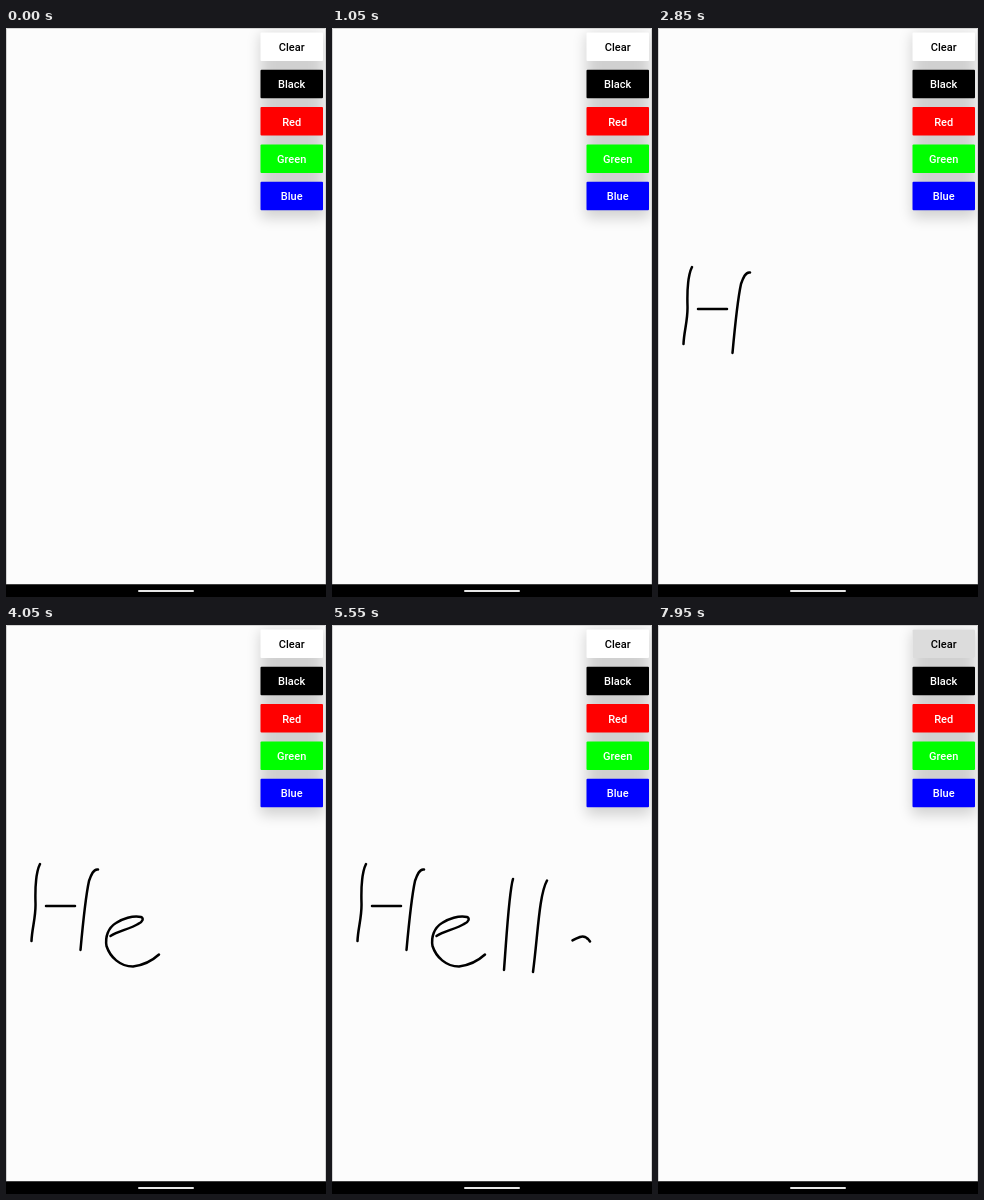
These frames come from a looping animation (320 px wide and 569 px high, 8 s). An HTML page:

```html
<!DOCTYPE html>
<html lang="en">
<head>
<meta charset="utf-8">
<title>Drawing pad</title>
<style>
  html, body { margin: 0; height: 100%; overflow: hidden; background: #000; }
  svg { display: block; width: 100%; height: 100%; }
  text { font: 500 11px Roboto, sans-serif; text-anchor: middle; }
  #ink path { fill: none; stroke: #000; stroke-width: 2.5; stroke-linecap: round; stroke-linejoin: round; }
</style>
</head>
<body>
<svg viewBox="0 0 320 569">
  <defs>
    <filter id="blur" x="-100%" y="-30%" width="300%" height="160%">
      <feGaussianBlur stdDeviation="7"/>
    </filter>
    <clipPath id="clearShape"><rect x="254.5" y="4.5" width="62.5" height="28.5" rx="1"/></clipPath>
  </defs>
  <rect width="320" height="556.5" fill="#fcfcfc"/>
  <rect x="254" y="6" width="64" height="184" opacity=".17" filter="url(#blur)"/>
  <path d="M.5 556V.5H319.5V556" fill="none" stroke="#d4d4d4"/>
  <g id="ink"></g>
  <g id="buttons"></g>
  <rect y="556.5" width="320" height="12.5"/>
  <rect x="132" y="562" width="56" height="2" rx="1" fill="#e6e6e6"/>
</svg>
<script>
const LOOP = 8000, PRESS = 7750, ERASE = 7880;
const $ = id => document.getElementById(id);

function add(parent, tag, attributes, text = '') {
  const node = document.createElementNS('http://www.w3.org/2000/svg', tag);
  for (const [key, value] of Object.entries(attributes)) node.setAttribute(key, value);
  node.textContent = text;
  return parent.appendChild(node);
}

const buttons = [
  ['Clear', '#fff', '#000'],
  ['Black', '#000', '#fff'],
  ['Red', '#f00', '#fff'],
  ['Green', '#0f0', '#fff'],
  ['Blue', '#00f', '#fff'],
];
let ripple;
buttons.forEach(([label, fill, ink], i) => {
  const y = 4.5 + i * 37.3;
  add($('buttons'), 'rect', { x: 254.5, y, width: 62.5, height: 28.5, rx: 1, fill });
  if (i === 0) ripple = add($('buttons'), 'circle',
    { cx: 286, cy: 19, fill: '#dcdcdc', 'clip-path': 'url(#clearShape)' });
  add($('buttons'), 'text', { x: 285.7, y: y + 18.4, fill: ink }, label);
});

// Each pen stroke: start time, end time, path.
const strokes = [
  [1130, 1680, 'M34 239C30 247 29 261 29.5 278C30 292 26 303 25.5 316'],
  [1830, 2330, 'M92 244.5C87.5 243.5 85 250 83 256C79.5 272 76.5 303 74.5 325'],
  [2480, 2760, 'M40 281H69'],
  [3000, 3950, 'M104.5 311C112 306 124 304 132 299C137 297 138 293 135 292C127 290 116 294 110 298C102 303 99 312 100.5 321C104 332 114 341.5 127 341.5C139 340 147 335 153 329.5'],
  [4300, 4560, 'M181 254C177 267 175 306 172 345'],
  [4825, 5230, 'M215 255.5C207 270 206 309 201 347'],
  [5420, 6300, 'M258 316.5C255 312 252 310.5 248 312C237 316 230 322 228 332C226 347 235 356 249 356C263 356 276 350 276 339C275 330 272 324 265.5 320.5'],
].map(([start, end, d]) => ({
  start, end,
  path: add($('ink'), 'path', { d, pathLength: 1, 'stroke-dasharray': '1 2' }),
}));

const clamp = value => Math.max(0, Math.min(1, value));

function draw(t) {
  for (const { start, end, path } of strokes) {
    const progress = clamp((t - start) / (end - start));
    path.setAttribute('stroke-dashoffset', 1 - progress);
    path.style.visibility = progress > 0 && t < ERASE ? 'visible' : 'hidden';
  }

  const press = clamp((t - PRESS) / 170);
  ripple.setAttribute('r', 36 * press);
  ripple.setAttribute('opacity', press);
}

const origin = performance.now();
function frame() {
  draw((performance.now() - origin) % LOOP);
  requestAnimationFrame(frame);
}
frame();
</script>
</body>
</html>
```
